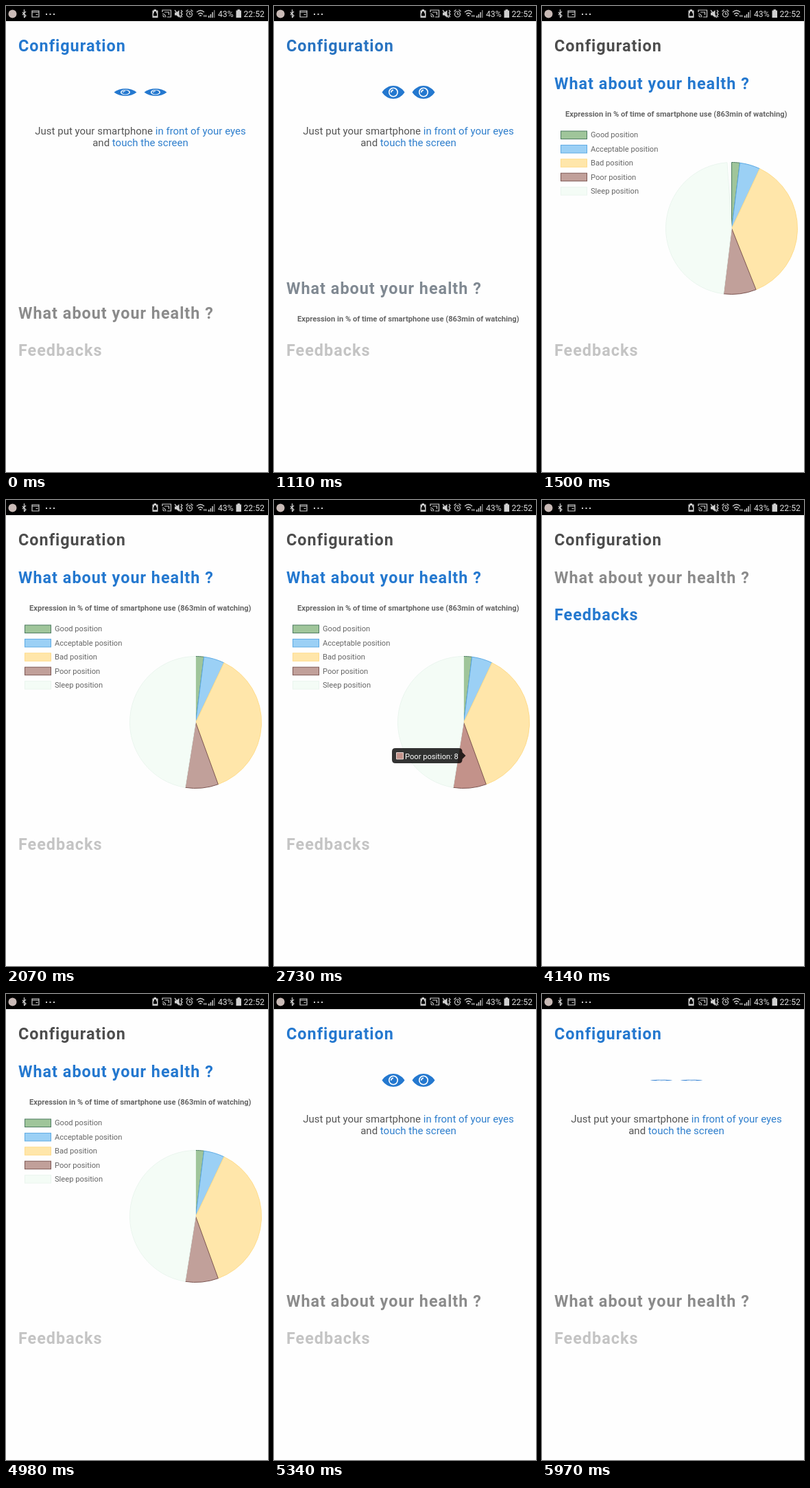
Animation, 382 px wide and 678 px high, one loop 6000 ms. Source, as an HTML page:

```html
<!DOCTYPE html>
<html lang="en">
<head>
<meta charset="utf-8">
<title>Health accordion</title>
<style>
html, body { margin: 0; height: 100%; overflow: hidden; background: #fefefe; }
svg { display: block; }
text { font-family: Roboto, sans-serif; white-space: pre; }
.head { font-size: 23.4px; font-weight: 700; letter-spacing: 1px; }
.body { font-size: 15px; fill: #555; text-anchor: middle; }
.body tspan { fill: #2f7fcd; }
.chart { font-size: 11.15px; fill: #666; }
.status { font-size: 12.2px; fill: #ddd; }
.icon { fill: none; stroke: #d0d0d0; stroke-width: 1.2; }
.solid { fill: #d0d0d0; }
</style>
</head>
<body>
<svg width="382" height="678">
  <defs>
    <g id="eye">
      <path fill="#2478cf" d="M-16.5 0C-8-12.7 8-12.7 16.5 0C8 12.7-8 12.7-16.5 0Z"/>
      <circle r="7" fill="#fff"/>
      <circle r="5.4" fill="#2478cf"/>
      <path d="M-3.2 .2A3.2 3.2 0 0 1 0-3.2" fill="none" stroke="#fff" stroke-width="1.7"/>
    </g>
  </defs>

  <svg id="config" y="85" width="382">
    <g transform="translate(0 -85)">
      <use class="eye" href="#eye"/>
      <use class="eye" href="#eye"/>
      <text class="body" x="196" y="186.5">Just put your smartphone <tspan>in front of your eyes</tspan></text>
      <text class="body" x="196" y="204">and <tspan>touch the screen</tspan></text>
    </g>
  </svg>

  <svg id="health" width="382">
    <g transform="translate(0 -139.5)">
      <text class="chart" x="34" y="161" font-weight="700">Expression in % of time of smartphone use (863min of watching)</text>
      <g id="legend"></g>
      <g id="pie" transform="translate(276.5 323.5)"></g>
      <g id="tip">
        <path fill="#000" fill-opacity=".8" d="M177 361H269.500Q274.500 361 274.500 366V367L279.500 372L274.500 377V378Q274.500 383 269.500 383H177Q172 383 172 378V366Q172 361 177 361Z"/>
        <path fill="#c3928a" stroke="#e8d8d5" d="M178.500 367.500h10v9.500h-10z"/>
        <text class="chart" x="191" y="376.500" style="fill:#fff">Poor position: 8</text>
      </g>
    </g>
  </svg>

  <text class="head" x="18" y="66.2">Configuration</text>
  <text class="head" x="18">What about your health ?</text>
  <text class="head" x="18">Feedbacks</text>

  <g id="bar">
    <path d="M0 0H382V22H0Z"/>
    <circle cx="9.500" cy="11.500" r="6" fill="#c9bab6"/>
    <path class="icon" d="M26.500 5v12M24 9l5 5-2.500 3M29 8l-5 5"/>
    <path class="icon" d="M38 7h10v9H38zM38 9h10M43.500 12.500h3"/>
    <path class="solid" d="M58 11h2v2h-2zm5.500 0h2v2h-2zm5.500 0h2v2h-2z"/>
    <path class="solid" d="M215.500 5h3.500v1.500h2.500V17h-8V6.500h2z"/>
    <path d="M215 10.500h5v4h-5zM216 8h3v3h-3z"/>
    <path class="icon" d="M228 9V6h12.500v10H235M228 11.500q4.500 0 5 5M228 14q2.500 0 2.500 2.500M231 9h6.500v4"/>
    <path class="solid" d="M246 9.500h2.500l4-3.500v11l-4-3.500H246z"/>
    <path class="icon" d="M246 6l9 11M255 6l2 2-2 2 2 2-2 2 2 2"/>
    <circle class="icon" cx="267.500" cy="12" r="4" stroke-width="2"/>
    <path class="icon" d="M262.500 8l3-2.500M269.500 5.500l3 2.500M267.500 9.500V12h2.500"/>
    <path class="icon" d="M278 9q5.500-5 11 0M280 12q3.500-3.500 7 0M282 14.500q1.500-1.500 3 0M289 13v3M291.500 13v3"/>
    <path class="solid" d="M295 14h1.500v3H295zm2.700-2h1.500v5h-1.500zm2.700-3h1.500v8h-1.500z"/>
    <path fill="#777" d="M303 6h1.500v11H303z"/>
    <text class="status" x="309" y="16">43%</text>
    <path class="solid" d="M337.500 5h3.500v1.500h2V17h-7.500V6.500h2z"/>
    <text class="status" x="346.500" y="16">22:52</text>
  </g>
</svg>

<script>
const LOOP = 6000, SLIDE = 370, PIE = 740, OPEN = 334, RADIUS = 96;
const BLUE = [36, 120, 207];
const GREYS = [77, 139, 196];

// [start time, tab opened by the tap]
const taps = [[-LOOP, 0], [1000, 1], [3520, 2], [4230, 1], [4990, 0]];

const slices = [
  ['Good', 2, '#9fc59a', '#4f7d63'],
  ['Acceptable', 5, '#9bd0f5', '#5caae4'],
  ['Bad', 37, '#ffe6aa', '#ffdc8c'],
  ['Poor', 8, '#c1a09a', '#7d5753'],
  ['Sleep', 47, '#f4fcf6', '#eaf5ee']
];
const total = slices.reduce((sum, s) => sum + s[1], 0);

const $ = id => document.getElementById(id);
const heads = document.querySelectorAll('.head');
const eyes = document.querySelectorAll('.eye');
const clamp = x => Math.min(1, Math.max(0, x));
const inOut = p => p < .5 ? 4 * p ** 3 : 1 - 4 * (1 - p) ** 3;
const outQuart = p => 1 - (1 - p) ** 4;

$('legend').innerHTML = slices.map(([name, , fill, line], i) => {
  const y = 182 + i * 20.4;
  return `<rect x="27.5" y="${y}" width="38" height="11.5" fill="${fill}" stroke="${line}"/>
    <text class="chart" x="71" y="${y + 9.4}">${name} position</text>`;
}).join('');

$('pie').innerHTML = slices.map(([, , fill, line]) =>
  `<path fill="${fill}" stroke="${line}" stroke-linejoin="round"/>`).join('');
const arcs = $('pie').children;

function rim(turn) {
  const a = turn * 2 * Math.PI;
  return `${RADIUS * Math.sin(a)} ${-RADIUS * Math.cos(a)}`;
}

function drawPie(grow) {
  let from = 0;
  slices.forEach(([, value], i) => {
    const part = value / total * grow, to = from + part;
    // Two arcs keep every slice below a half turn
    arcs[i].setAttribute('d', `M0 0L${rim(from)}` +
      [from + part / 2, to].map(a => `A${RADIUS} ${RADIUS} 0 0 1 ${rim(a)}`).join('') + 'Z');
    from = to;
  });
}

function blink(t) {
  const phase = (t + 30) % 2000;
  const p = clamp(Math.min(phase, 2000 - phase) / 100);
  return .05 + .95 * (1 - (1 - p) ** 2);
}

function draw(t) {
  const n = taps.findLastIndex(([start]) => start <= t);
  const [start, tab] = taps[n];
  const e = inOut(clamp((t - start) / SLIDE));
  const open = [0, 0, 0];
  if (n) open[taps[n - 1][1]] = 1 - e;
  open[tab] = n ? e : 1;

  const y1 = 120.8 + OPEN * open[0];
  const y2 = 175.4 + OPEN * (open[0] + open[1]);
  heads[1].setAttribute('y', y1);
  heads[2].setAttribute('y', y2);
  heads.forEach((head, i) => {
    const mix = BLUE.map(c => Math.round(GREYS[i] + (c - GREYS[i]) * open[i]));
    head.setAttribute('fill', `rgb(${mix})`);
  });

  $('config').setAttribute('height', OPEN * open[0]);
  $('health').setAttribute('y', y1 + 18.7);
  $('health').setAttribute('height', OPEN * open[1]);

  const lid = blink(t);
  eyes.forEach((eye, i) =>
    eye.setAttribute('transform', `translate(${174 + 44 * i} 125.5) scale(1 ${lid})`));

  drawPie(tab === 1 ? outQuart(clamp((t - start) / PIE)) : 1);
  const tip = outQuart(clamp((t - 2500) / 210)) * (1 - outQuart(clamp((t - 2900) / 200)));
  $('tip').setAttribute('opacity', tip);
  arcs[3].setAttribute('fill', tip > .5 ? '#c3928a' : slices[3][2]);
}

function tick() {
  draw(performance.now() % LOOP);
  requestAnimationFrame(tick);
}
tick();
</script>
</body>
</html>
```
